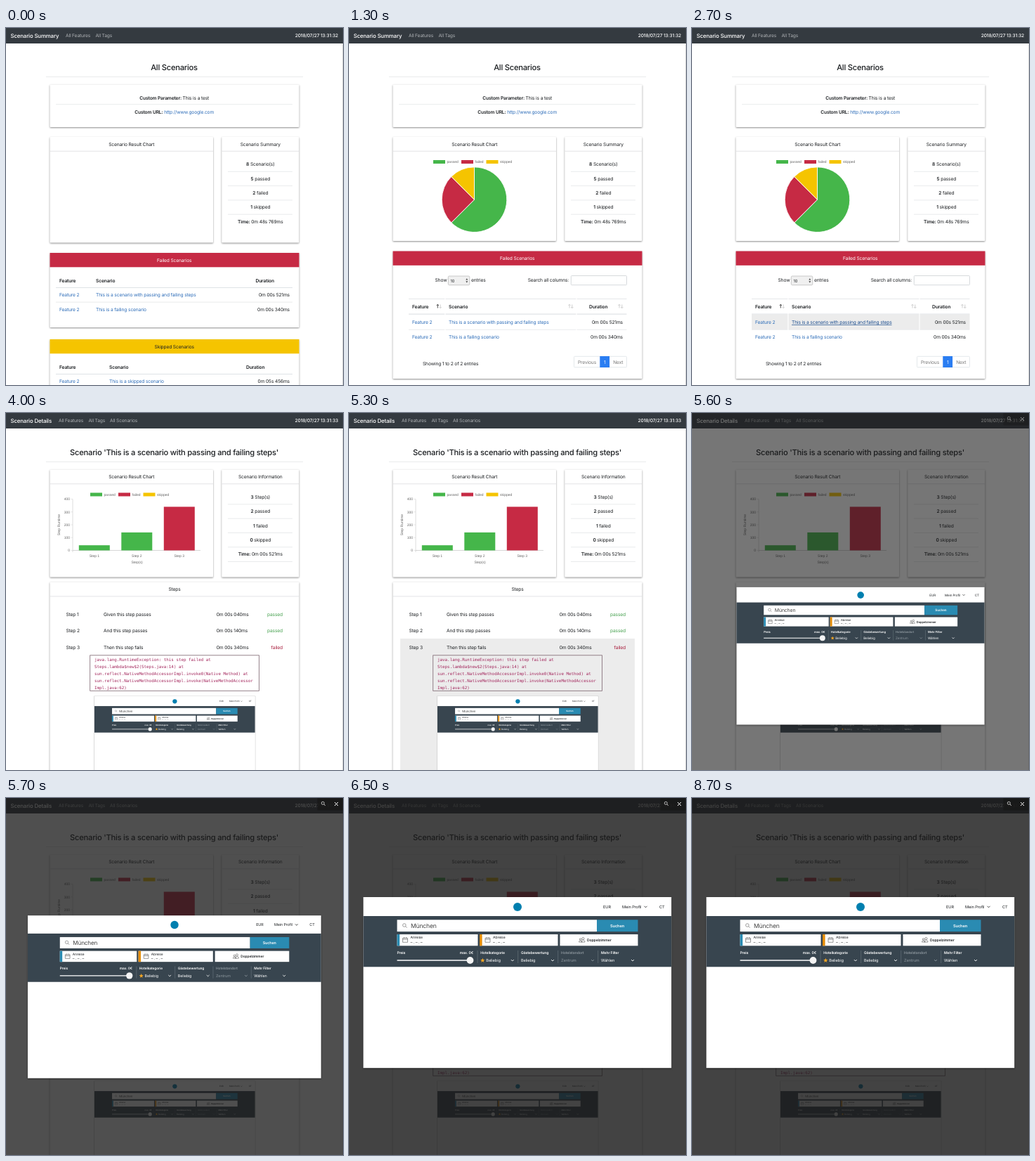
An HTML page for the animation above (8800 ms loop, 480x508 px).

```html
<!DOCTYPE html>
<html lang="en">
<head>
<meta charset="utf-8">
<title>Scenario report</title>
<style>
html, body { margin: 0; width: 100%; height: 100%; overflow: hidden; background: #fff; }
svg { display: block; width: 480px; height: 508px; }
text { font: 6.67px Inter, "Open Sans", sans-serif; letter-spacing: -.022em; fill: #1c1f22; text-rendering: geometricPrecision; white-space: pre; }
.m { text-anchor: middle; }
.e { text-anchor: end; }
.b { font-weight: 600; }
.w { fill: #fff; }
.h { font-size: 11.2px; font-weight: 500; }
.brand { font-size: 7.9px; font-weight: 500; fill: #fff; }
.clock { font-weight: 500; fill: #fff; }
.nav { fill: #aeb1b4; }
.a { fill: #2c6cb8; }
.g { fill: #777; }
.ok { fill: #45a04e; }
.bad { fill: #a81c3c; }
.c { font: 5px "Liberation Sans", Arial, sans-serif; letter-spacing: 0; fill: #666; }
.code { font: 5.86px "DejaVu Sans Mono", monospace; letter-spacing: 0; fill: #a3265c; }
.s5 { font-size: 5.1px; }
.s6 { font-size: 5.7px; }
.s8 { font-size: 8.6px; fill: #444; }
.dim { fill: #8d979e; }
.card { fill: #fff; filter: drop-shadow(0 1px .9px rgba(0,0,0,.45)); }
#zoomed { filter: drop-shadow(0 1px 1.2px rgba(0,0,0,.5)); }
</style>
</head>
<body>
<svg id="stage" viewBox="0 0 480 508"></svg>
<script>
const LOOP = 8800;
const GREEN = '#45b64a', RED = '#c62a44', YELLOW = '#f5c400';
const SHARES = [[GREEN, 5 / 8], [RED, 2 / 8], [YELLOW, 1 / 8]];
const STEPS = [40, 140, 340];

const text = (x, y, s, cls = '') => `<text x="${x}" y="${y}" class="${cls}">${s}</text>`;
const rect = (x, y, w, h, fill, more = '') => `<rect x="${x}" y="${y}" width="${w}" height="${h}" fill="${fill}" ${more}/>`;
const path = (d, stroke, w = 1, more = '') => `<path d="${d}" fill="none" stroke="${stroke}" stroke-width="${w}" ${more}/>`;
const rule = (x1, x2, y, color = '#e4e6e8', w = .8) => path(`M${x1} ${y}H${x2}`, color, w);
const card = (x, y, w, h) => `<rect class="card" x="${x}" y="${y}" width="${w}" height="${h}" rx="1"/>`;
const group = (id, body) => `<g id="${id}">${body}</g>`;
const bold = s => `<tspan font-weight="600">${s}</tspan>`;
const titled = (x, y, w, h, title) =>
  card(x, y, w, h) + text(x + w / 2, y + 12.6, title, 'm') + rule(x, x + w, y + 20.3, '#dcdee0');

function frame(brand, links, clock, title) {
  return rect(0, 0, 480, 508, '#fff') + path('M479.5 22V508', '#ddd') +
    rect(0, 0, 480, 22, '#343a40') + text(6.5, 13.6, brand, 'brand') +
    links.map(([x, s]) => text(x, 13.3, s, 'nav')).join('') +
    text(473, 13.3, clock, 'e clock') + text(239.5, 60.3, title, 'm h') + rule(57, 423, 69.5);
}

function totals(y, rows) {
  return rows.map(([n, s], i) => {
    const by = y + i * 20.3;
    return text(362.3, by, bold(n) + ' ' + s, 'm') + (i < 4 ? rule(316, 408, by + 7.9) : '');
  }).join('');
}

function legend(y) {
  return [[120, GREEN, 'passed'], [160, RED, 'failed'], [195.5, YELLOW, 'skipped']]
    .map(([x, c, s]) => rect(x, y, 17, 5, c) + text(x + 19.6, y + 4.4, s, 'c')).join('');
}

// Plain table shown before the page script has run
function plainTable(y, fill, title, cls, col, dur, rows) {
  return card(62.5, y, 355, 106) + rect(62.5, y, 355, 20.3, fill) + text(239.7, y + 12.5, title, 'm ' + cls) +
    text(76, y + 41.5, 'Feature', 'b') + text(col, y + 41.5, 'Scenario', 'b') + text(dur, y + 41.5, 'Duration', 'b') +
    rule(71, 408, y + 49.5, '#dee2e6', 1) +
    rows.map(([s, d], i) => {
      const by = y + 62.3 + i * 20.6;
      return (i ? rule(71, 408, by - 12.8) : '') +
        text(76, by, 'Feature 2', 'a') + text(col, by, s, 'a') + text(404, by, d, 'e');
    }).join('');
}

const arrow = (x, dir, color) =>
  path(`M${x} ${396 - dir * 2.5}V${396 + dir * 2.5}M${x - 1.6} ${396 - dir}L${x} ${396 - dir * 2.7}L${x + 1.6} ${396 - dir}`, color, .8);
const sorter = (x, up) => arrow(x, 1, up) + arrow(x + 3.8, -1, '#c4c4c4');
const cells = (y, h, fill) => [[85, 136.3], [137.5, 323.4], [324.6, 395.5]]
  .map(([a, b]) => rect(a, y, b - a, h, fill)).join('');

function dataTable() {
  const row = (y, s, d, id) => text(90, y, 'Feature 2', 'a') +
    `<text ${id} x="142" y="${y}" class="a">${s}</text>` + text(390, y, d, 'e');
  return card(62.5, 317.5, 355, 181.5) + rect(62.5, 317.5, 355, 20.3, RED) + text(239.7, 330, 'Failed Scenarios', 'm w') +
    text(122.5, 361.4, 'Show') + rect(141.3, 353, 30.5, 12.8, '#f0f0f0', 'rx="1.5" stroke="#b5b5b5" stroke-width=".7"') +
    text(144.5, 361.8, '10', 's6') +
    '<path d="M166.3 358.6l1.5-2.3 1.5 2.3zM166.3 360.2l1.5 2.3 1.5-2.3z" fill="#444"/>' +
    text(174, 361.4, 'entries') + text(313.2, 361.4, 'Search all columns:', 'e') +
    rect(316.3, 352.5, 79.2, 13.2, '#fff', 'rx="1" stroke="#ccd0d4" stroke-width=".8"') +
    cells(385, .8, '#dfe2e5') + cells(406.6, 1, '#d9dde0') +
    group('rowHover', cells(407.6, 21.4, '#ececec')) +
    text(90, 398.5, 'Feature', 'b') + text(142, 398.5, 'Scenario', 'b') + text(342, 398.5, 'Duration', 'b') +
    sorter(126.3, '#222') + sorter(314, '#c4c4c4') + sorter(385, '#c4c4c4') +
    cells(428.8, .8, '#e4e6e8') +
    row(421, 'This is a scenario with passing and failing steps', '0m 00s 521ms', 'id="rowLink"') +
    row(442, 'This is a failing scenario', '0m 00s 340ms', '') +
    text(105, 479.7, 'Showing 1 to 2 of 2 entries') +
    rect(320.5, 467.3, 75, 15.5, '#fff', 'rx="1" stroke="#dee2e6" stroke-width=".8"') +
    rect(357.3, 467, 13.8, 16, '#2a7df2') + text(339, 477.6, 'Previous', 'm g') +
    text(364.2, 477.6, '1', 'm w') + text(383.3, 477.6, 'Next', 'm g');
}

function summaryPage() {
  const bottoms = h => titled(62.5, 155, 232.5, h, 'Scenario Result Chart') +
    titled(307.3, 155, 110, h, 'Scenario Summary');
  return frame('Scenario Summary', [[85, 'All Features'], [127.5, 'All Tags']], '2018/07/27 13:31:32', 'All Scenarios') +
    card(62.5, 80.5, 355, 60.5) + text(239.7, 101.6, bold('Custom Parameter:') + ' This is a test', 'm') +
    rule(71, 408, 108.7) +
    text(239.7, 121.6, bold('Custom URL:') + ' <tspan class="a">http://www.google.com</tspan>', 'm') +
    group('before', bottoms(150.5) +
      plainTable(320, RED, 'Failed Scenarios', 'w', 128, 355.5, [
        ['This is a scenario with passing and failing steps', '0m 00s 521ms'],
        ['This is a failing scenario', '0m 00s 340ms']]) +
      plainTable(443, YELLOW, 'Skipped Scenarios', '', 147, 342, [['This is a skipped scenario', '0m 05s 456ms']])) +
    group('after', bottoms(148) + legend(188) + group('pie', '') + dataTable()) +
    totals(196.4, [['8', 'Scenario(s)'], ['5', 'passed'], ['2', 'failed'], ['1', 'skipped'], ['Time:', '0m 48s 769ms']]);
}

function barChart() {
  const ticks = [0, 100, 200, 300, 400].map(v => {
    const y = 195.5 - v * .1825;
    return text(91, y + 1.8, v, 'c e') + rule(92.5, 95, y, '#d0d0d0', .5);
  }).join('');
  return legend(113.5) + ticks + path('M95 122.5V198', '#c8c8c8', .6) + rule(95, 277, 195.5, '#bbb', .6) +
    group('bars', '') + [1, 2, 3].map(n => text(65.5 + n * 60.4, 205, 'Step ' + n, 'c m')).join('') +
    text(186.5, 213.8, 'Step(s)', 'c m') +
    '<text class="c m" transform="translate(77.3 159)rotate(-90)">Step Runtime</text>';
}

function detailsPage() {
  const step = (i, s, ms, res) => {
    const y = 288.8 + i * 23.5;
    return text(85.5, y, 'Step ' + (i + 1)) + text(139, y, s) + text(299.7, y, `0m 00s ${ms}ms`) +
      text(394, y, res, 'e ' + (res === 'passed' ? 'ok' : 'bad'));
  };
  const trace = ['java.lang.RuntimeException: this step failed at', 'Steps.lambda$new$2(Steps.java:14) at',
    'sun.reflect.NativeMethodAccessorImpl.invoke0(Native Method) at',
    'sun.reflect.NativeMethodAccessorImpl.invoke(NativeMethodAccessor', 'Impl.java:62)'];
  return frame('Scenario Details', [[75, 'All Features'], [117.5, 'All Tags'], [148, 'All Scenarios']],
      '2018/07/27 13:31:33', "Scenario 'This is a scenario with passing and failing steps'") +
    titled(62.5, 80.5, 232.5, 153, 'Scenario Result Chart') + barChart() +
    titled(307.3, 80.5, 110, 153, 'Scenario Information') +
    totals(122, [['3', 'Step(s)'], ['2', 'passed'], ['1', 'failed'], ['0', 'skipped'], ['Time:', '0m 00s 521ms']]) +
    rule(316, 408, 211.5) +
    titled(62.5, 240.6, 355, 290, 'Steps') +
    group('stepHover', rect(73, 321, 334, 190, '#ececec')) +
    step(0, 'Given this step passes', '040', 'passed') + step(1, 'And this step passes', '140', 'passed') +
    step(2, 'Then this step fails', '340', 'failed') +
    rect(119.7, 344.8, 240.8, 50.5, 'none', 'stroke="#7d6570" stroke-width=".8"') +
    trace.map((s, i) => text(126, 353 + i * 9.9, s, 'code')).join('') +
    rect(125.7, 403, 229.3, 130, '#fff', 'stroke="#ccc" stroke-width=".8"') +
    `<use href="#shot" transform="${place(0)}"/>`;
}

// Screenshot, drawn at its full-size position
function screenshot() {
  const chevron = (x, y, c = '#fff') => path(`M${x - 2} ${y - 1}l2 2 2-2`, c, .9);
  const field = (x, w, c, s) => rect(x, 194, w, 16.3, '#fff') + rect(x, 194, 3.6, 16.3, c) +
    path(`M${x + 8} 199.3h7v6h-7zM${x + 8} 201.2h7M${x + 10} 198v2M${x + 13} 198v2`, '#555', .6) +
    text(x + 19, 200.4, s, 's5') + text(x + 19, 206.6, '– . – . –', 's6');
  const filter = (x, label, value, end, dim = '', dx = 0) => path(`M${x - 4.3} 217V235`, '#66727a', .7) +
    text(x, 222.2, label, 's5 b ' + (dim || 'w')) + text(x + dx, 233, value, 's6 ' + (dim || 'w')) +
    chevron(end, 231, dim ? '#8d979e' : '#fff');
  return rect(20.4, 141, 438.8, 243.2, '#fff') +
    '<circle cx="240" cy="155" r="6" fill="#007faf"/>' +
    text(362, 157, 'EUR', 's6') + text(389, 157, 'Mein Profil', 's6') + chevron(422.5, 154.8, '#333') + text(442, 157, 'CT', 's6') +
    rect(20.4, 168, 438.8, 72.3, '#38454f') +
    rect(68.5, 173.3, 284.5, 16.8, '#fff') + path('M80.5 182.6l2 2', '#777', .8) +
    '<circle cx="78.8" cy="181" r="2.3" fill="none" stroke="#777" stroke-width=".7"/>' +
    text(88, 184.8, 'München', 's8') + rect(353, 173.3, 58.5, 16.8, '#2a8bb2') + text(382, 184, 'Suchen', 's6 m b w') +
    field(68.5, 115, '#2a8bb2', 'Anreise') + field(186, 111.5, '#e58e0a', 'Abreise') +
    rect(300.5, 194, 111, 16.3, '#fff') +
    path('M327.5 205c0-3 4.5-3 4.5 0zM331 205c0-4 5-4 5 0z', '#555', .6) +
    '<g fill="none" stroke="#555" stroke-width=".6"><circle cx="329.6" cy="201" r="1.3"/><circle cx="333.4" cy="200" r="1.6"/></g>' +
    text(339, 204, 'Doppelzimmer', 's5 b') +
    text(68.5, 222.2, 'Preis', 's5 b w') + text(177, 222.2, 'max. 0€', 's5 e b w') +
    rule(68.5, 172, 231, '#fff', 1.3) + '<circle cx="172.5" cy="231" r="4.9" fill="#f4f4f4"/>' +
    filter(187.3, 'Hotelkategorie', 'Beliebig', 232.8, '', 8) +
    '<path d="M190.3 227.8l.9 2.2 2.3.1-1.8 1.5.6 2.3-2-1.3-2 1.3.6-2.3-1.8-1.5 2.3-.1z" fill="#f5a623"/>' +
    filter(245, 'Gästebewertung', 'Beliebig', 290) + filter(302, 'Hotelstandort', 'Zentrum', 347, 'dim') +
    filter(359, 'Mehr Filter', 'Wählen', 404);
}

const clamp = v => Math.max(0, Math.min(1, v));
const easeOut = p => 1 - (1 - clamp(p)) ** 4;

// cubic-bezier(.4, 0, .22, 1)
function easeZoom(p) {
  if (p <= 0 || p >= 1) return clamp(p);
  let lo = 0, hi = 1;
  for (let i = 0; i < 24; i++) {
    const s = (lo + hi) / 2, r = 1 - s;
    if (1.2 * s * r * r + .66 * s * s * r + s ** 3 < p) lo = s; else hi = s;
  }
  return lo * lo * (3 - 2 * lo);
}

// From the thumbnail (0) to the full-size picture (1)
function place(p) {
  const mix = (a, b) => a + (b - a) * p;
  return `translate(${mix(126, 20.4)} ${mix(403, 141)})scale(${mix(228.6 / 438.8, 1)})translate(-20.4 -141)`;
}

function pieSlices(grow) {
  let from = -Math.PI / 2;
  const point = a => `${178.5 + 46.3 * Math.cos(a)} ${244.2 + 46.3 * Math.sin(a)}`;
  return SHARES.map(([color, share]) => {
    const size = share * 2 * Math.PI * grow, to = from + size;
    const d = `M178.5 244.2L${point(from)}A46.3 46.3 0 ${size > Math.PI ? 1 : 0} 1 ${point(to)}Z`;
    from = to;
    return `<path d="${d}" fill="${color}" stroke="#fff" stroke-width=".9"/>`;
  }).join('');
}

const barRects = grow => STEPS.map((v, i) => {
  const h = v * .1825 * grow;
  return rect(103.8 + i * 60.5, 195.5 - h, 44, h, i < 2 ? GREEN : RED);
}).join('');

const $ = id => document.getElementById(id);
$('stage').innerHTML = `<defs>${group('shot', screenshot())}</defs>` +
  group('summary', summaryPage()) + group('details', detailsPage()) +
  '<rect id="shade" width="480" height="508" fill="#1a1a1a"/>' +
  '<use id="zoomed" href="#shot"/>' +
  group('tools', rect(443.5, 0, 36.5, 17.5, '#181818', 'opacity=".85"') +
    '<circle cx="451.3" cy="7.3" r="2" fill="none" stroke="#ddd" stroke-width=".8"/>' +
    path('M452.8 8.8l2 2', '#ddd', .9) + path('M468 6l5 5M473 6l-5 5', '#fff', 1));

const show = (id, on) => $(id).setAttribute('display', on ? 'inline' : 'none');

function draw(t) {
  const loaded = t >= 50, details = t >= 2750, hover = t >= 1950;
  show('summary', !details);
  show('details', details);
  show('before', !loaded);
  show('after', loaded);
  show('rowHover', hover);
  $('rowLink').style.cssText = hover ? 'fill:#174a8c;text-decoration:underline' : '';
  if (details) $('bars').innerHTML = barRects(easeOut((t - 2780) / 1000));
  else $('pie').innerHTML = pieSlices(easeOut((t - 50) / 1000));
  show('stepHover', t >= 4250 && t < 5600);

  show('zoomed', t >= 5437);
  $('zoomed').setAttribute('transform', place(easeZoom((t - 5437) / 412)));
  $('shade').setAttribute('opacity', .82 * easeZoom((t - 5392) / 440));
  $('tools').setAttribute('opacity', clamp((t - 5500) / 200));
}

const start = performance.now();
function tick() {
  draw((performance.now() - start) % LOOP);
  requestAnimationFrame(tick);
}
tick();
</script>
</body>
</html>
```
